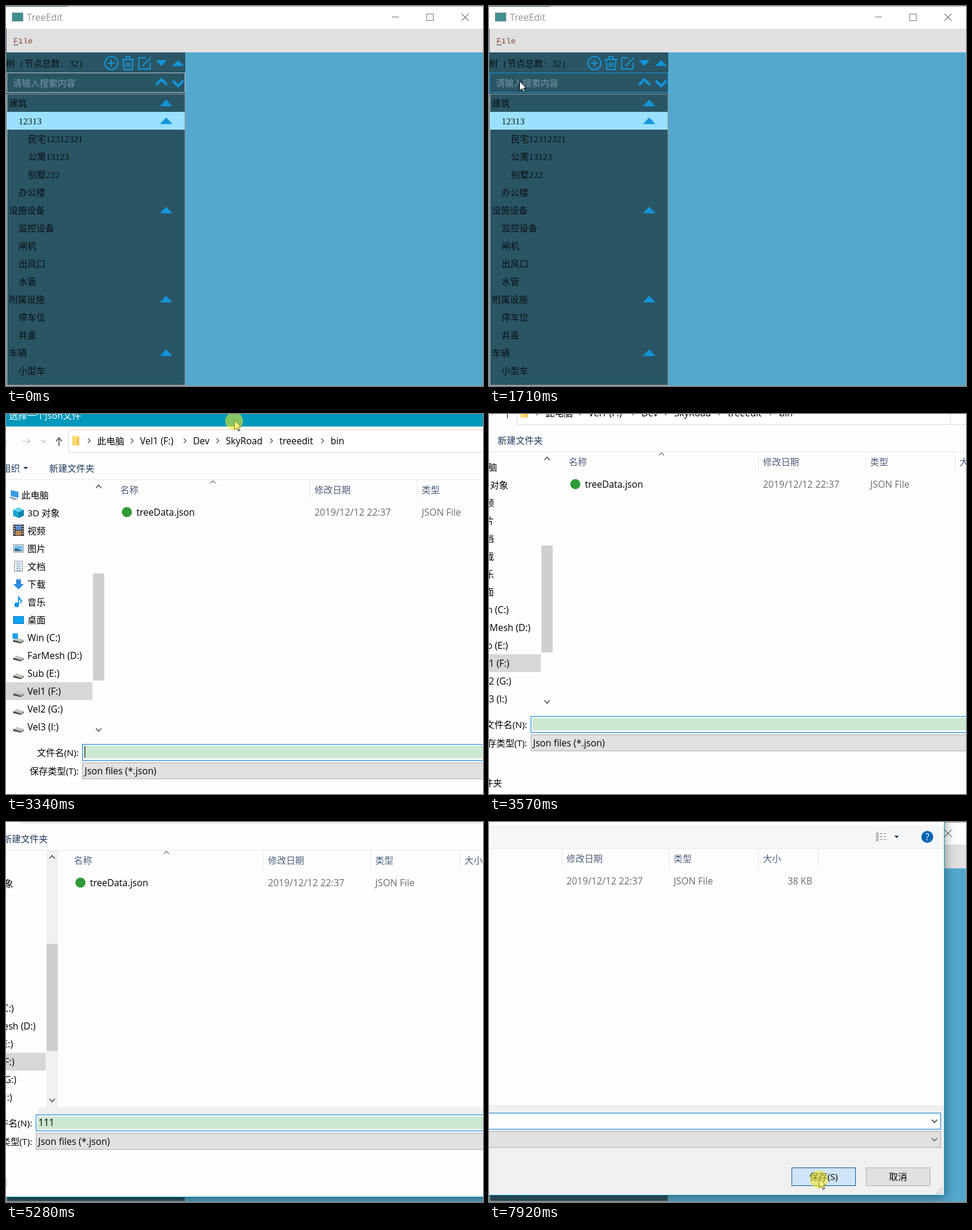
An HTML page with a canvas for the animation above (7990 ms loop, 801 by 639 pixels).

```html
<!DOCTYPE html>
<html lang="zh">
<head>
<meta charset="utf-8">
<title>TreeEdit</title>
<style>
html, body { margin: 0; width: 801px; height: 639px; overflow: hidden; }
canvas { display: block; }
</style>
</head>
<body>
<canvas width="801" height="639"></canvas>
<script>
const ctx = document.querySelector('canvas').getContext('2d');
const LOOP = 7990, BLUE = '#1296db', ACCENT = '#0078d7';
const SANS = '"Open Sans", "Noto Sans CJK SC", "Noto Sans CJK", sans-serif';
const SERIF = '"Liberation Serif", "Noto Sans CJK SC", "Noto Sans CJK", serif';

// [time, x, y] keys
const CURSOR = [[210, 790, 470], [820, 250, 180], [990, 240, 170], [1480, 28, 60], [1710, 51, 126],
  [1790, 55, 135], [2180, 310, 608], [2410, 323, 602], [2960, 422, 65], [3120, 422, 65],
  [3340, 383, 10], [3650, 305, -53], [7000, 600, -30], [7070, 598, 33], [7700, 556, 592], [7840, 554, 599]];
const DRAG = [[3120, 0, 0], [3340, -39, -55], [3650, -117, -118], [6689, -117, -118], [6690, -252, -117], [6910, -427, -121]];
const KEYS = [2860, 3970, 4200, 4440, 5460];
const TREE = [[0, '建筑', 1], [1, '12313', 1], [2, '民宅12312321'], [2, '公寓13123'], [2, '别墅222'], [1, '办公楼'],
  [0, '设施设备', 1], [1, '监控设备'], [1, '闸机'], [1, '出风口'], [1, '水管'],
  [0, '附属设施', 1], [1, '停车位'], [1, '井盖'], [0, '车辆', 1], [1, '小型车'], [1, '大型车']];
const PLACES = ['此电脑', '3D 对象', '视频', '图片', '文档', '下载', '音乐', '桌面',
  'Win (C:)', 'FarMesh (D:)', 'Sub (E:)', 'Vel1 (F:)', 'Vel2 (G:)', 'Vel3 (I:)'];
const CRUMBS = [[192, '此电脑'], [264, 'Vel1 (F:)'], [353, 'Dev'], [408, 'SkyRoad'], [498, 'treeedit'], [584, 'bin']];

function at(keys, t) {
  const i = keys.findIndex(k => k[0] > t);
  if (i < 0) return keys[keys.length - 1].slice(1);
  if (i === 0) return keys[0].slice(1);
  const a = keys[i - 1], b = keys[i], u = (t - a[0]) / (b[0] - a[0]);
  return [1, 2].map(n => Math.round(a[n] + (b[n] - a[n]) * u));
}

function rect(x, y, w, h, fill, border, width = 1) {
  if (fill) { ctx.fillStyle = fill; ctx.fillRect(x, y, w, h); }
  if (border) {
    ctx.strokeStyle = border;
    ctx.lineWidth = width;
    ctx.strokeRect(x + width / 2, y + width / 2, w - width, h - width);
  }
}

function trace(points) {
  ctx.beginPath();
  for (let i = 0; i < points.length; i += 2) ctx.lineTo(points[i], points[i + 1]);
}
function line(color, width, ...points) {
  trace(points);
  ctx.strokeStyle = color;
  ctx.lineWidth = width;
  ctx.stroke();
}
function poly(color, ...points) {
  trace(points);
  ctx.fillStyle = color;
  ctx.fill();
}
function disc(x, y, r, color) {
  ctx.beginPath();
  ctx.arc(x, y, r, 0, 7);
  ctx.fillStyle = color;
  ctx.fill();
}

function text(str, x, y, color = '#000', align = 'left', size = /[一-龥]/.test(str) ? 15.2 : 15.6) {
  ctx.font = `${size}px ${SANS}`;
  ctx.textAlign = align;
  ctx.fillStyle = color;
  ctx.fillText(str, x, y + 5.5);
}

// Fixed-pitch text: full cells for Chinese, half cells for Latin
function cells(str, x, y, color = '#0b0f12') {
  ctx.font = '15px ' + SERIF;
  ctx.textAlign = 'center';
  ctx.fillStyle = color;
  for (const ch of str) {
    const w = ch < '\u0100' ? 7.75 : 15;
    ctx.fillText(ch, x + w / 2, y + 5.5);
    x += w;
  }
}

const triangle = (x, y, w, h, color) => poly(color, x - w / 2, y + h / 2, x + w / 2, y + h / 2, x, y - h / 2);
const chevron = (x, y, w, h, color, width = 1.3) => line(color, width, x - w, y + h, x, y - h, x + w, y + h);
const chevronRight = (x, y) => line('#555', 1.3, x - 2, y - 4, x + 2, y, x - 2, y + 4);

function drawMain(t) {
  rect(0, 0, 801, 639, '#54a8ce');
  rect(0, 0, 801, 38, '#fff');
  rect(0, 0, 801, 1, '#a8a8a8');
  rect(0, 0, 103, 1, '#2a5565');
  rect(10, 11, 19, 15, '#3f8f91', '#7f8f96');
  text('TreeEdit', 35, 19, '#949494', 'left', 15.8);
  line('#777', 1, 648, 18.5, 660, 18.5);
  rect(706, 13, 12, 12, null, '#777');
  line('#777', 1.1, 765, 13, 777, 25);
  line('#777', 1.1, 777, 13, 765, 25);

  rect(0, 38, 801, 40, '#e0e0e0');
  ctx.font = '13.5px "Liberation Mono", monospace';
  ctx.textAlign = 'left';
  ctx.fillStyle = '#8a3a28';
  ctx.fillText('File', 12.5, 63);
  rect(13, 65, 8, 1, '#333');

  rect(0, 78, 301, 561, '#2a5565');
  cells('树 (节点总数: 32)', 0, 96);
  ctx.beginPath();
  ctx.arc(177, 96, 11, 0, 7);
  ctx.strokeStyle = BLUE;
  ctx.lineWidth = 2;
  ctx.stroke();
  line(BLUE, 2, 171, 96, 183, 96);
  line(BLUE, 2, 177, 90, 177, 102);
  line(BLUE, 2, 194, 90, 216, 90);
  line(BLUE, 2, 201, 89, 202, 85, 208, 85, 209, 89);
  line(BLUE, 2, 197, 90, 198, 107, 212, 107, 213, 90);
  for (const x of [202, 205, 208]) line(BLUE, 1.6, x, 95, x, 103);
  line(BLUE, 2, 235, 87, 223, 87, 223, 106, 242, 106, 242, 95);
  line(BLUE, 2, 229, 101, 243, 87);
  triangle(261, 96, 18, -10, BLUE);
  triangle(289, 96, 20, 10, BLUE);

  const hover = t >= 1630 && t < 1790;
  rect(1, 112, 300, 34, null, hover ? BLUE : '#c4c8ca');
  cells('请输入搜索内容', 11.5, 129, '#789aa2');
  chevron(261, 128, 9, 4.5, BLUE, 4.2);
  chevron(289, 130, 9, -4.5, BLUE, 4.2);

  rect(1, 148, 300, 490, null, '#948f8b');
  rect(1, 148, 1, 490, '#d8dcde');
  rect(2, 178, 298, 30, '#99e1ff');
  ctx.save();
  ctx.beginPath();
  ctx.rect(2, 149, 298, 488);
  ctx.clip();
  TREE.forEach(([depth, label, open], i) => {
    const y = 163 + 30 * i;
    cells(label, 5 + 16 * depth, y);
    if (open) triangle(269, y, 21, 11, BLUE);
  });
  ctx.restore();
  rect(0, 38, 1, 601, '#3c6878');
  rect(0, 638, 801, 1, '#8fa4ae');
}

function drive(x, y) {
  poly('#c4c4c4', x, y + 4, x + 6, y, x + 18, y + 4, x + 13, y + 7);
  poly('#4a4a4a', x, y + 4, x + 13, y + 7, x + 13, y + 10, x, y + 7);
  poly('#888', x + 13, y + 7, x + 18, y + 4, x + 18, y + 7, x + 13, y + 10);
  rect(x + 9, y + 7, 3, 1, '#6fd45a');
}

function placeIcon(i, x, y) {
  switch (i) {
    case 0:
      poly('#3a9be0', 47, y - 8, 60, y - 5, 60, y + 5, 47, y + 2);
      poly('#9aa7b0', 43, y + 4, 48, y + 3, 59, y + 7, 53, y + 9);
      break;
    case 1:
      poly('#5fd3ee', x, y - 5, x + 9, y - 9, x + 18, y - 5, x + 9, y - 1);
      poly('#15a5cf', x, y - 5, x + 9, y - 1, x + 9, y + 9, x, y + 5);
      poly('#0b83ad', x + 18, y - 5, x + 9, y - 1, x + 9, y + 9, x + 18, y + 5);
      break;
    case 2:
      rect(x, y - 10, 18, 19, '#333');
      rect(x + 4, y - 9, 10, 8, '#5b8fd0');
      rect(x + 4, y, 10, 8, '#b98a55');
      for (let k = -8; k < 8; k += 4) {
        rect(x + 1, y + k, 2, 2, '#ddd');
        rect(x + 15, y + k, 2, 2, '#ddd');
      }
      break;
    case 3:
      rect(x, y - 7, 18, 14, '#fff', '#8a8a8a');
      rect(x + 2, y - 5, 14, 10, '#79c3f0');
      poly('#356f8d', x + 2, y + 5, x + 2, y, x + 7, y, x + 16, y + 5);
      break;
    case 4:
      rect(x + 2, y - 9, 14, 18, '#fff', '#7b8790');
      for (let k = -6; k < 7; k += 3) rect(x + 5, y + k, 8, 1, '#4d87ae');
      break;
    case 5:
      poly('#2f8be0', x + 5, y - 8, x + 13, y - 8, x + 13, y, x + 18, y, x + 9, y + 9, x, y, x + 5, y);
      break;
    case 6:
      disc(x + 6, y + 5, 4, '#1496e8');
      line('#1496e8', 2, x + 9, y + 5, x + 9, y - 8, x + 14, y - 2, x + 12, y + 2);
      break;
    case 7:
      rect(x, y - 6, 18, 13, '#0aa3f5', '#0670b4');
      break;
    default:
      drive(x, y);
      if (i === 8) rect(x - 1, y - 7, 9, 9, '#18a0e8');
  }
}

function combo(y, fill, border) {
  rect(167, y, 1019, 28, fill, border);
  chevron(1175, y + 14, 4.5, -2.2, '#444');
}

function button(x, label, fill, border, width) {
  rect(x, 702, 108, 31, fill, border, width);
  text(label, x + 54, 717, '#000', 'center');
}

function drawDialog(t) {
  const settled = t >= 6690, pressed = t >= 7920;
  ctx.save();
  ctx.translate(...at(DRAG, t));
  ctx.shadowColor = 'rgba(0,0,0,.45)';
  ctx.shadowBlur = 18;
  ctx.shadowOffsetY = 3;
  rect(9, 38, 1183, 711, '#0099bc');
  ctx.shadowColor = 'transparent';
  rect(10, 76, 1181, 672, '#fdfdfd');
  rect(20, 50, 17, 14, '#2d8489', '#e8f4f6');
  text('选择一个Json文件', 44, 57, '#fff');

  // Navigation bar
  line('#ccc', 1.5, 41, 101, 27, 101);
  line('#ccc', 1.5, 32, 96, 27, 101, 32, 106);
  line('#ccc', 1.5, 65, 101, 79, 101);
  line('#ccc', 1.5, 74, 96, 79, 101, 74, 106);
  chevron(102, 101, 3.5, -2, '#bbb');
  line('#555', 1.6, 128, 109, 128, 95);
  line('#555', 1.6, 123, 101, 128, 95, 133, 101);
  rect(144, 81, 771, 39, '#fff', '#d9d9d9');
  rect(872, 81, 1, 39, '#d9d9d9');
  rect(927, 81, 259, 39, '#fff', '#d9d9d9');
  rect(150, 92, 11, 16, '#ffda78');
  rect(158, 94, 4, 14, '#f4c552');
  for (const [x, label] of CRUMBS) {
    chevronRight(x - 13.5, 100);
    text(label, x, 100.5);
  }

  // Toolbar
  if (settled) rect(10, 127, 1181, 38, '#f5f6f7');
  text('组织', 32, 146, '#1e395b');
  triangle(72, 146, 8, -4, '#1e395b');
  text('新建文件夹', 111.5, 146, '#1e395b');
  for (let y = 139; y < 154; y += 5) {
    rect(1077, y, 4, 4, null, '#888');
    rect(1083, y + 1, 5, 1, '#888');
    rect(1090, y + 1, 4, 1, '#888');
  }
  triangle(1111.5, 146, 8, -4, '#1e395b');
  disc(1163, 146, 10, '#0063b1');
  text('?', 1163, 146, '#fff', 'center');
  rect(10, 165, 1181, 1, '#e6e8ea');

  // Places
  rect(10, 506, 174, 30, '#d7d7d7');
  PLACES.forEach((label, i) => {
    const y = 191 + 30 * i;
    placeIcon(i, 51, y);
    text(label, i ? 75 : 65, y + .5);
  });
  if (t >= 3650) {
    rect(185, 166, 19, 431, '#f0f0f0');
    rect(171, 597, 1020, 13, '#f0f0f0');
  }
  rect(185, 323, 19, 180, '#cfcfcf');
  chevron(194.5, 177, 4.5, 2.5, '#555', 1.8);
  chevron(194.5, 586, 4.5, -2.5, '#555', 1.8);

  // File list
  for (const x of [549, 729, 879, 979]) rect(x, 166, 1, 32, '#e3e5e8');
  chevron(386.5, 169.5, 4.5, 2.2, '#666', 1.1);
  const HEAD = '#4c607a', MUTED = '#6d6d6d';
  text('名称', 231, 182, HEAD);
  text('修改日期', 557, 182, HEAD);
  text('类型', 737, 182, HEAD);
  text('大小', 887, 182, HEAD);
  disc(242, 220, 8.5, '#2f9a38');
  text('treeData.json', 258, 220);
  text('2019/12/12 22:37', 557, 220, MUTED, 'left', 15.8);
  text('JSON File', 737, 220, MUTED, 'left', 15.8);
  text('38 KB', 970, 220, MUTED, 'right');

  // Footer
  if (settled) rect(10, 597, 1181, 151, '#f0f0f0');
  text('文件名(N):', 161, 624, '#000', 'right');
  text('保存类型(T):', 161, 655, '#000', 'right');
  text('隐藏文件夹', 119, 722, '#000', 'right');
  combo(610, '#fff', ACCENT);
  if (!pressed) rect(170, 613, settled && t >= 6910 ? 994 : 1013, 21, '#cce8cf');
  chevron(1175, 624, 4.5, -2.2, '#444');
  const typed = KEYS.filter(k => k <= t);
  const count = Math.max(0, typed.length - 1);
  text('1'.repeat(count), 171.5, 623.5);
  if (typed.length && !pressed && (t - typed[count]) % 1060 < 530) {
    rect(171 + Math.round(count * 9), 613, 1, 20, '#000');
  }
  combo(641, '#e1e1e1', '#adadad');
  text('Json files (*.json)', 171, 655.5);
  const hover = t >= 7700;
  button(935, '保存(S)', hover ? '#cfe5f7' : '#e1e1e1', hover ? '#005a9e' : ACCENT, hover ? 1 : 2);
  button(1060, '取消', '#e1e1e1', '#adadad', 1);
  for (let i = 0; i < 3; i++) {
    for (let j = 0; j <= i; j++) rect(1186 - 4 * j, 736 + 4 * i, 2, 2, '#b5b5b5');
  }
  ctx.restore();
}

function drawCursor(t) {
  if (t < 210) return;
  const [x, y] = at(CURSOR, t);
  ctx.save();
  ctx.translate(x + .5, y + .5);
  if (t >= 2180 && t < 2490) {
    const shape = [0, -11, 4, -6, 1, -6, 1, 6, 4, 6, 0, 11, -4, 6, -1, 6, -1, -6, -4, -6, 0, -11];
    poly('#fff', ...shape);
    line('#000', 1, ...shape);
  } else {
    const shape = [0, 0, 0, 16, 4, 12.5, 6.5, 18, 9, 17, 6.5, 11.5, 11, 11.5, 0, 0];
    poly('#fff', ...shape);
    line('#000', 1, ...shape);
  }
  if (t >= 3120 && t < 3650 || t >= 7920) disc(-.5, 1.5, 15, 'rgba(245,235,30,.55)');
  ctx.restore();
}

function draw(now) {
  const t = now % LOOP;
  drawMain(t);
  if (t >= 1790) drawDialog(t);
  drawCursor(t);
  requestAnimationFrame(draw);
}
requestAnimationFrame(draw);
</script>
</body>
</html>
```
